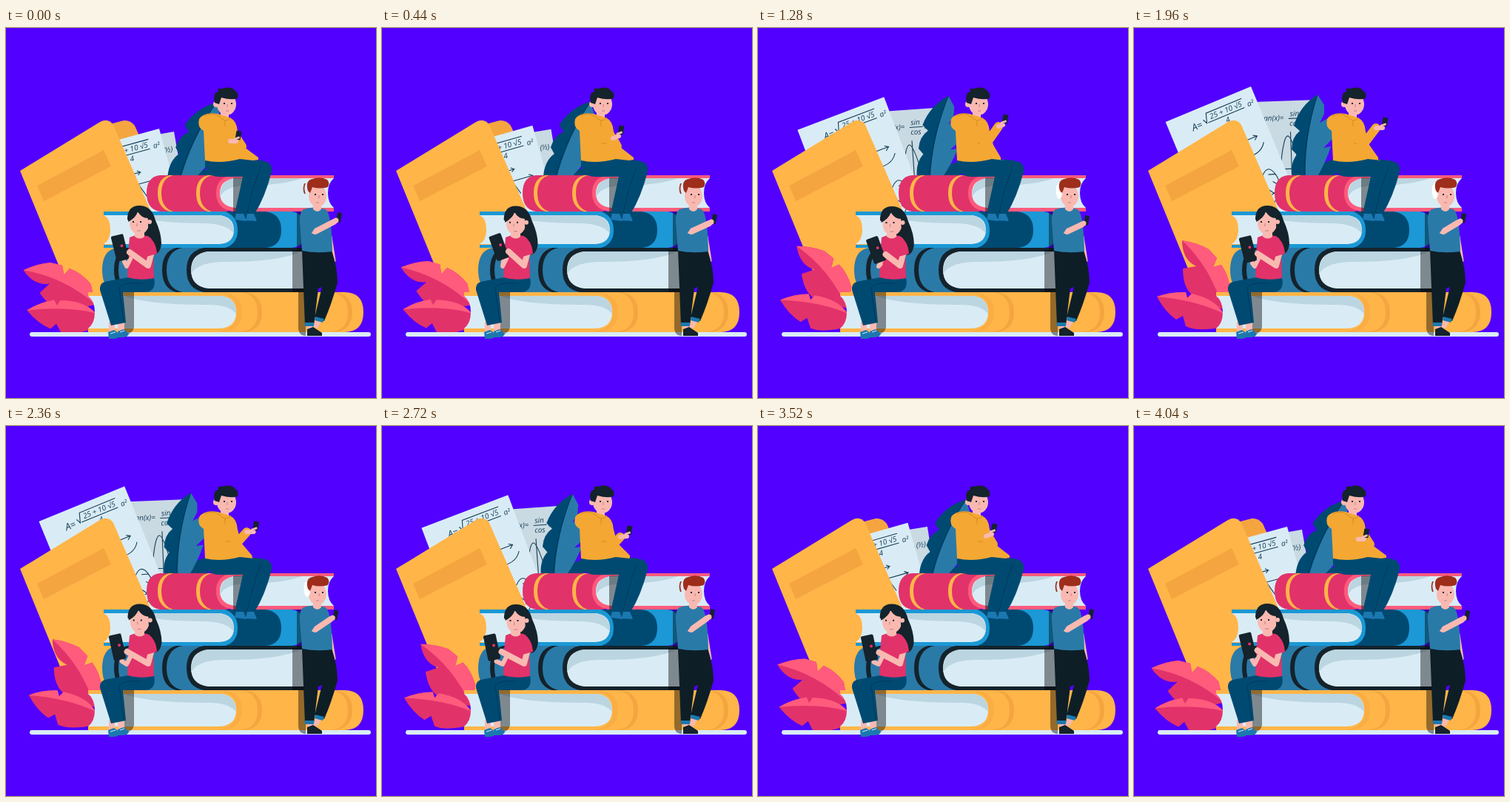
Animation of 500x500 px, one loop 4080 ms. Source, as an HTML page:

```html
<!DOCTYPE html>
<html lang="en">
<head>
<meta charset="utf-8">
<title>Reading on books</title>
<style>
html, body { margin: 0; width: 100%; height: 100%; overflow: hidden; background: #5200ff; }
svg { display: block; width: 100%; height: 100%; }
text { font: italic 10px "Open Sans", sans-serif; fill: #173d54; }
.ink { fill: none; stroke: #173d54; stroke-width: 1.1; }
.limb { fill: none; stroke-linecap: round; stroke-linejoin: round; }
.face { fill: none; stroke: #c57f7f; }
.skin { fill: #f9b9b1; } .yellow { fill: #ffb548; } .amber { fill: #f5a540; }
.navy { fill: #004a72; } .blue { fill: #2a7aa8; } .sky { fill: #1b98d5; }
.black { fill: #14232c; } .rose { fill: #e2326a; } .pink { fill: #ff5b7d; }
.page { fill: #d9ecf5; } .fold { fill: #bbd5e1; } .shade { fill: #000; opacity: .42; }
.shoe { fill: #1b78b0; }
</style>
</head>
<body>
<svg viewBox="0 0 500 500">
  <!-- sheets and notebook -->
  <g id="backSheet">
    <path fill="#c9dae3" d="M-100 0H0V150H-100Z"/>
    <text x="-76" y="26">tan(x)=</text>
    <text x="-37" y="21">sin</text>
    <text x="-38" y="34">cos</text>
    <text x="-19" y="26">(½)</text>
    <path class="ink" d="M-39 24H-21M-37 42V100M-55 92H-20M-52 88C-44 30 -38 38 -26 88"/>
  </g>
  <path class="amber" d="M140 130 159 125Q168 124 174 132L200 190V250H150Z"/>
  <g id="frontSheet">
    <path class="page" d="M-125 0H0V190H-125Z"/>
    <text x="-95" y="26" style="font-size:13px">A=</text>
    <text x="-67" y="20">25 + 10 √5</text>
    <text x="-49" y="33">4</text>
    <text x="-14" y="24">a²</text>
    <path class="ink" d="M-77 17 -74 23 -70 10 -18 10M-72 23H-19M-60 50H-40L-44 47M-40 50 -44 53M-60 65H-19M-23 62 -18 65 -23 69M-38 87Q-20 88 -13 76M-48 62 -40 84M-36 122Q-20 102 -15 122T-30 146M-50 110 -20 155M-24 119 -15 122M-34 160 -12 140M-22 130 -16 138"/>
  </g>
  <path class="yellow" d="M19 193 127 127Q138 121 145 131L202 262 190 357H86Z"/>
  <path class="amber" d="M42 213 132 165 142 187 51 234Z"/>

  <!-- plants -->
  <g id="blueLeaf">
    <path class="navy" d="M240 199Q250 182 272 177V200Z"/>
    <path class="navy" d="M248 90Q224 105 216 132L224 139Q213 148 213 164L220 171Q210 184 214 204H238Q250 185 250 140Z"/>
    <path class="blue" d="M248 90 257 104 257 116 251 128 262 122Q268 130 268 150L256 162 266 160Q260 180 246 204H232Q230 150 248 90Z"/>
    <path fill="none" stroke="#00395a" d="M248 90Q230 145 230 200"/>
  </g>
  <g id="upperLeaf">
    <path class="rose" d="M65 287Q85 290 101 299L112 311 107 323 118 320Q128 334 130 353L120 380Q95 372 78 360Q66 350 66 325L84 322Q65 313 65 287Z"/>
    <path class="pink" d="M65 287Q85 290 101 299L112 311 107 323 118 320Q128 334 130 353L120 380Q105 325 65 287Z"/>
  </g>
  <g id="lowerLeaf">
    <path class="rose" d="M31 363Q50 356 70 357L72 365 78 359Q110 366 121 386V404Q85 411 70 403L66 389 57 394Q42 384 31 363Z"/>
    <path class="pink" d="M31 363Q50 356 70 357L72 365 78 359Q110 366 121 386Q85 368 31 363Z"/>
  </g>
  <rect class="page" x="32" y="411" width="461" height="6" rx="3"/>

  <!-- yellow book -->
  <path class="yellow" d="M111 357H457Q483 357 483 384T457 411H111V406H130V362H111Z"/>
  <path class="amber" d="M323 357Q346 360 346 384T323 411H317Q340 408 340 384T317 357ZM445 357Q468 360 468 384T445 411H439Q462 408 462 384T439 357Z"/>
  <path class="amber" d="M295 357Q319 361 319 384T295 411H287Q312 407 312 384T287 357Z" opacity=".5"/>
  <path class="page" d="M111 362H288Q311 363 311 384T288 406H111Q120 399 120 384T111 362Z"/>
  <path class="fold" d="M160 362H288Q311 363 311 386Q300 373 270 374Q190 374 160 362Z"/>

  <!-- black book -->
  <path class="blue" d="M150 297H275V357H150Q130 354 130 327T150 297Z"/>
  <path class="black" d="M172 297Q152 302 152 327T172 357H164Q146 352 146 327T164 297ZM238 297Q217 302 217 327T238 357H230Q211 352 211 327T230 297Z"/>
  <path class="black" d="M268 297H405V357H268Q244 353 244 327T268 297Z"/>
  <path class="page" d="M405 302H273Q250 305 250 327T273 352H405Z"/>
  <path class="fold" d="M400 302H273Q250 305 250 333Q257 318 290 316Q365 317 400 302Z"/>

  <!-- blue book -->
  <path class="sky" d="M132 248H385Q405 250 405 273T385 297H132V293H150V253H132Z"/>
  <path class="navy" d="M296 248H351Q372 251 372 273T351 297H296Q313 292 313 273T296 248Z"/>
  <path class="page" d="M132 253H288Q308 255 308 273T288 292H132Q141 287 141 272T132 253Z"/>
  <path class="fold" d="M170 253H288Q308 255 308 278Q299 265 270 264Q200 264 170 253Z"/>

  <!-- pink book -->
  <path class="rose" d="M208 199H300V248H208Q190 245 190 223T208 199Z"/>
  <path class="yellow" d="M226 199Q210 203 210 223T226 248H221Q205 243 205 223T221 199ZM278 199Q262 203 262 223T278 248H273Q257 243 257 223T273 199Z"/>
  <path class="pink" d="M306 199H443V203H420V243H443V248H306Q284 244 284 223T306 199Z"/>
  <path class="page" d="M443 203H309Q289 206 289 223T309 243H443Q435 236 435 223T443 203Z"/>
  <path class="fold" d="M400 203H309Q289 206 289 228Q296 215 320 213Q375 213 400 203Z"/>

  <path class="shade" d="M307 202H322L318 249H307ZM158 352H173V404Q172 413 160 415ZM393 248H405V416Q395 416 395 404V357H387V300H393Z"/>

  <!-- seated man -->
  <path class="shoe" d="M311 250 321 251 325 261 309 259ZM326 250 335 251 339 261 324 260Z"/>
  <path class="navy" d="M269 179Q300 174 345 179Q361 181 359 194Q350 229 336 251H309L320 201H288Q267 200 269 179Z"/>
  <path fill="none" stroke="#00395a" d="M344 187Q332 220 326 250"/>
  <path class="skin" d="M290 109H301V121Q296 126 290 121Z"/>
  <path id="hoodie" fill="#f4a833"/>
  <path fill="none" stroke="#d88b22" d="M268 119Q280 113 288 120M288 119Q296 130 304 121M296 125V133M297 156H304"/>
  <path id="sleeve" class="limb" stroke="#f4a833" stroke-width="12"/>
  <path id="wrist" class="limb" stroke="#f9b9b1" stroke-width="6"/>
  <g id="manPhone">
    <rect class="black" x="-3.5" y="-6" width="7" height="12" rx="1"/>
    <path class="limb" stroke="#f9b9b1" stroke-width="3" d="M-4 6 1 3"/>
  </g>
  <ellipse class="skin" cx="298" cy="103" rx="13" ry="15"/>
  <circle class="skin" cx="284" cy="103" r="4"/>
  <path class="black" d="M282 101Q279 87 287 86Q285 80 292 82Q304 78 310 85Q315 88 313 95Q305 98 291 94L288 103Z"/>
  <path class="face" d="M299 103V107M297 112H301"/>
  <path class="black" d="M294 101h2v2h-2zM304 101h2v2h-2z"/>

  <!-- standing man -->
  <path class="limb" stroke="#f9b9b1" stroke-width="5" d="M438 282 443 314"/>
  <path class="skin" d="M407 400H414V408H407ZM418 394 426 397 421 406 415 405Z"/>
  <path class="black" d="M407 407 415 404 427 412V416H407Z"/>
  <path fill="#0e1e27" d="M400 300H440Q448 325 448 344Q440 373 430 396L417 391 427 350 422 352 416 402H404Z"/>
  <path class="shoe" d="M404 398H416V403H404ZM418 390 430 393 428 398 417 395Z"/>
  <path class="blue" d="M402 245Q416 240 432 245Q440 251 441 302Q420 305 400 301L397 262Q396 249 402 245Z"/>
  <path class="skin" d="M415 235H426V245Q421 251 415 245Z"/>
  <path id="boyArm" class="limb" stroke="#f9b9b1" stroke-width="8"/>
  <path class="blue" d="M399 251Q409 249 413 258L419 268 411 280 399 272Z"/>
  <g id="boyPhone">
    <rect class="black" x="-3" y="-6.5" width="6" height="13" rx="1" transform="rotate(10)"/>
    <circle class="skin" cx="-4" cy="4" r="3.5"/>
  </g>
  <ellipse class="skin" cx="421" cy="227" rx="12" ry="15"/>
  <ellipse id="earWhite" fill="#fff" cx="407" cy="220" rx="4.5" ry="11"/>
  <path id="earLine" fill="none" stroke="#a3301c" stroke-width="1.8" d="M404 210Q401 217 404 224"/>
  <path fill="#9e2d1b" d="M408 220Q404 206 414 204Q425 200 434 205Q438 209 435 215Q424 218 414 215L411 223Z"/>
  <path class="face" d="M423 226V230M419 236H423"/>
  <path class="black" d="M417 224h2v2h-2zM427 224h2v2h-2z"/>

  <!-- girl -->
  <g id="hair"><path class="black" d="M164 259Q164 240 180 240Q197 240 202 260Q210 277 210 292Q208 306 199 306Q192 298 183 270Z"/></g>
  <path class="skin" d="M139 397H147V412H139ZM151 396H160V411H151Z"/>
  <path class="shoe" d="M138 411 146 408 154 414Q153 420 145 420H139ZM151 410 159 407 166 413Q165 418 157 418H151Z"/>
  <path fill="none" stroke="#d9ecf5" d="M141 413 148 411M154 411 160 409"/>
  <path class="navy" d="M165 337H200Q204 357 187 357H158L162 398 142 402 127 354Q126 343 138 342Z"/>
  <path fill="none" stroke="#00395a" d="M184 345Q156 343 153 351L159 397"/>
  <path class="rose" d="M167 283Q176 278 191 281Q200 284 203 304L199 309 200 338Q181 342 164 337L165 305Z"/>
  <path class="skin" d="M174 270H187V282Q181 287 174 282Z"/>
  <path id="farArm" class="limb" stroke="#f9b9b1" stroke-width="6"/>
  <g id="tablet">
    <rect class="black" x="-8.5" y="-17.5" width="17" height="35" rx="2"/>
    <circle class="rose" cx="3" cy="-2" r="2"/>
  </g>
  <path id="nearArm" class="limb" stroke="#f9b9b1" stroke-width="8"/>
  <path class="rose" d="M189 284Q202 283 204 305L190 309Z"/>
  <g id="face">
    <ellipse class="skin" cx="180" cy="264" rx="13" ry="15"/>
    <path class="black" d="M165 262Q165 242 180 241Q198 242 199 263L195 279Q191 270 192 257Q183 257 178 248Q176 256 165 262Z"/>
    <circle class="skin" cx="194" cy="262" r="3"/>
    <path class="face" d="M177 264V268M177 274H182"/>
    <path class="black" d="M171 261h2v2h-2zM181 261h2v2h-2z"/>
  </g>
</svg>
<script>
const LOOP = 4080, HALF = 2000, STEP = 40;
const KEYS = [0, 440, 1280, 1960, 2720, 3520];
const N = KEYS.length;
const set = (id, name, value) => document.getElementById(id).setAttribute(name, value);
const move = (id, x, y, angle = 0, cx = 0, cy = 0) =>
  set(id, 'transform', `translate(${x} ${y}) rotate(${angle} ${cx} ${cy})`);
const smoother = u => u * u * u * (u * (6 * u - 15) + 10);

// Smooth periodic curve through one value per key time
function curve(t, values) {
  const time = j => KEYS[(j + N) % N] + LOOP * Math.floor(j / N);
  const value = j => values[(j + N) % N];
  const slope = j => (value(j + 1) - value(j - 1)) / (time(j + 1) - time(j - 1));
  const i = KEYS.filter(k => k <= t).length - 1;
  const span = time(i + 1) - time(i), u = (t - time(i)) / span, v = 1 - u;
  return v * v * ((1 + 2 * u) * value(i) + u * span * slope(i))
       + u * u * ((3 - 2 * u) * value(i + 1) - v * span * slope(i + 1));
}

function draw(t) {
  const q = 1 - smoother(Math.max(0, Math.min(t, 2 * HALF - t)) / HALF);
  const at = (...values) => curve(t, values);

  move('frontSheet', 158 + 49 * q, 79 + 57 * q, -22.6 + 7.3 * q);
  move('backSheet', 247 - 20 * q, 97 + 43 * q, -2 - 8 * q);
  move('blueLeaf', 5 * q, 0, 17 * q, 228, 200);
  move('upperLeaf', -3 * q, -4 * q, -34 * q, 118, 372);
  move('lowerLeaf', 0, 0, -12 * q, 118, 385);

  const hem = at(341, 340, 328, 330, 335, 340);
  const px = at(314, 323, 334, 339, 334, 319), py = at(145, 138, 123, 127, 141, 138);
  const wx = at(303, 312, 325, 327, 322, 308), wy = at(153, 149, 133, 135, 150, 149);
  set('hoodie', 'd', `M261 123Q268 113 286 116L302 121Q312 125 313 140L318 158L${hem} 175V178L334 179L316 177Q290 184 269 179L267 139Q258 134 261 123Z`);
  set('sleeve', 'd', `M304 137L${hem - 22} 160L${wx} ${wy}`);
  set('wrist', 'd', `M${wx} ${wy}L${px - 3} ${py + 8}`);
  move('manPhone', px, py, 10);

  const bx = at(450, 449, 444, 445, 446, 450), by = at(256, 258, 260, 257, 254, 254);
  set('boyArm', 'd', `M411 272L418 275L${bx - 7} ${by + 6}`);
  move('boyPhone', bx, by);
  const turned = t > 900 && t < 2400;
  set('earWhite', 'opacity', turned ? 1 : 0);
  set('earLine', 'opacity', turned ? 0 : 1);

  const tx = at(154, 158, 159.5, 154, 148.5, 150.5), ty = at(297, 296, 300, 299, 299, 300);
  const nod = at(0, 1, 1.5, 0, 1.5, 1);
  move('tablet', tx, ty, at(-14, -20, -20, -14, -12, -12));
  set('nearArm', 'd', `M196 306L192 321L${tx + 13} ${ty + 6}`);
  set('farArm', 'd', `M168 312L163 322L${tx + 6} ${ty + 19}`);
  move('face', nod, nod * .7);
  move('hair', nod * .6, nod * .6);
}

function frame(now) {
  draw(Math.floor(now % LOOP / STEP) * STEP);
  requestAnimationFrame(frame);
}
draw(0);
requestAnimationFrame(frame);
</script>
</body>
</html>
```
